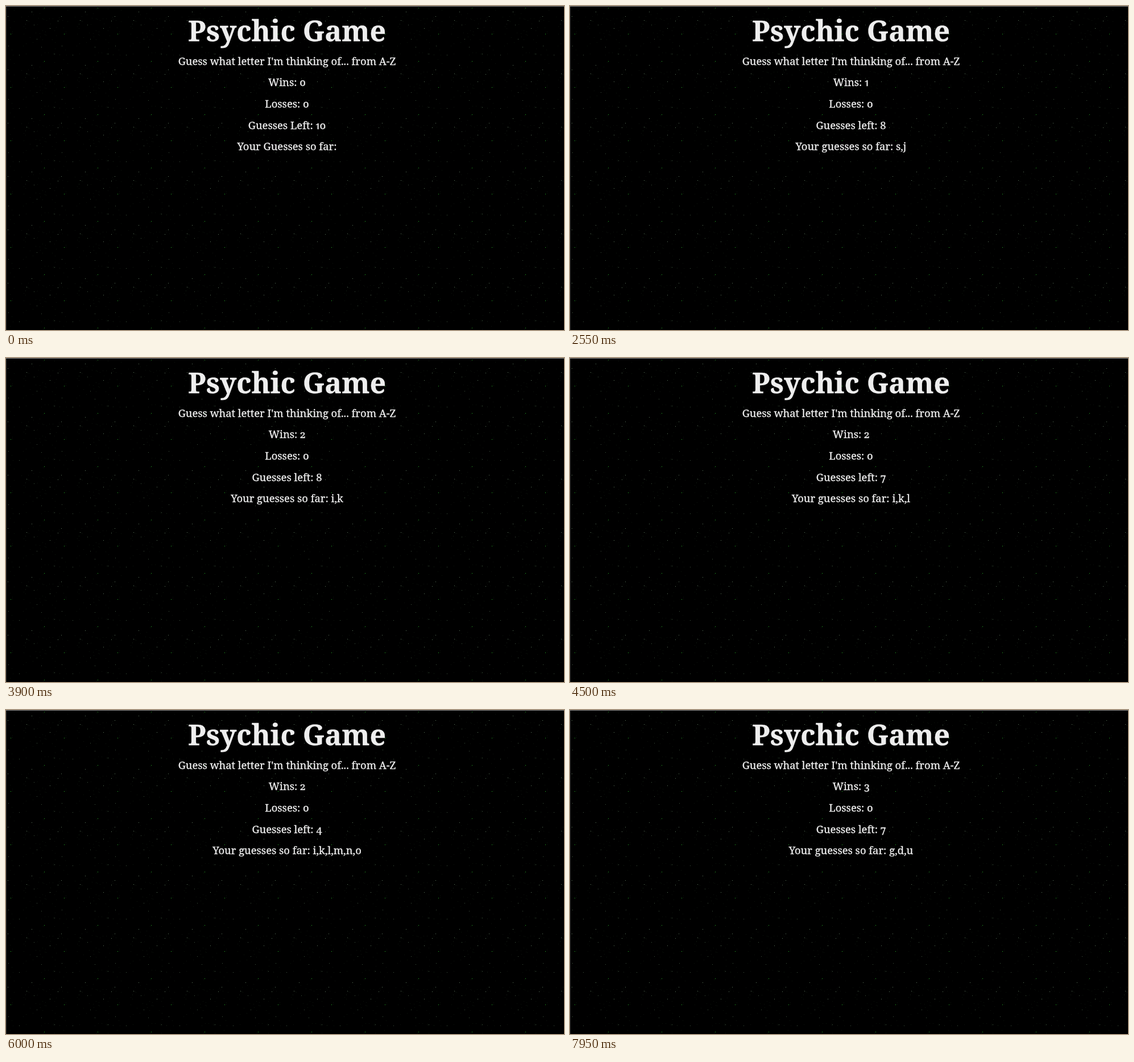
These frames come from a looping animation (981x571 px, 8 s). An HTML page:

```html
<!DOCTYPE html>
<html lang="en">
<head>
<meta charset="utf-8">
<title>Psychic Game</title>
<style>
  html, body { margin: 0; width: 100%; height: 100%; overflow: hidden; background: #000; }
  svg { display: block; width: 981px; height: 571px; }
  text {
    font: 18.4px "Noto Serif", serif;
    font-variant-numeric: oldstyle-nums proportional-nums;
    fill: #eee;
    stroke: #eee;
    stroke-width: .35px;
    text-anchor: middle;
  }
  .title { font-size: 50px; font-weight: 700; }
</style>
</head>
<body>
<svg viewBox="0 0 981 571">
  <defs>
    <pattern id="stars" width="94" height="94" patternUnits="userSpaceOnUse"></pattern>
  </defs>
  <rect width="981" height="571" fill="#000"/>
  <rect width="981" height="571" fill="url(#stars)"/>
  <rect width="1" height="571" fill="#2b2b2b"/>
  <rect width="981" height="1" fill="#8a8a8a"/>
  <text class="title" x="494" y="62">Psychic Game</text>
  <text x="494" y="103.5">Guess what letter I'm thinking of... from A-Z</text>
  <text id="wins" x="494" y="141"></text>
  <text x="494" y="179">Losses: 0</text>
  <text id="left" x="494" y="216.5"></text>
  <text id="guesses" x="494" y="254"></text>
</svg>
<script>
  const LOOP = 8000;
  const TILE = 94;
  const byId = id => document.getElementById(id);

  function addStar(x, y, fill) {
    const dot = document.createElementNS('http://www.w3.org/2000/svg', 'rect');
    const attrs = { x, y, width: 1, height: 1, fill };
    for (const name in attrs) dot.setAttribute(name, attrs[name]);
    byId('stars').append(dot);
  }

  // Star tile: faint seeded dust, then the visible stars grouped by colour.
  let seed = 7;
  const random = () => (seed = seed * 16807 % 2147483647) / 2147483647;
  const spot = () => Math.floor(random() * TILE);
  for (let i = 0; i < 60; i++) addStar(spot(), spot(), '#0c140c');

  const stars = {
    '#28b428': [[8, 49], [67, 3]],
    '#5f7a5f': [[36, 25], [91, 26], [45, 10], [77, 39], [3, 18]],
    '#3f553f': [[54, 58], [4, 70], [62, 72], [85, 84], [23, 86], [49, 33]]
  };
  for (const [color, spots] of Object.entries(stars)) {
    for (const [x, y] of spots) addStar(x, y, color);
  }

  // Start time, wins, letters guessed in the current round.
  const steps = [
    [0, 0, ''], [450, 1, ''], [900, 1, 's'], [2550, 1, 'sj'],
    [3000, 2, ''], [3450, 2, 'i'], [3900, 2, 'ik'], [4500, 2, 'ikl'],
    [4950, 2, 'iklm'], [5400, 2, 'iklmn'], [6000, 2, 'iklmno'],
    [6450, 3, ''], [7050, 3, 'g'], [7500, 3, 'gd'], [7950, 3, 'gdu']
  ];

  let shown;
  function show(step) {
    if (step === shown) return;
    shown = step;
    const [start, wins, letters] = step;
    const fresh = start === 0;
    byId('wins').textContent = `Wins: ${wins}`;
    byId('left').textContent = `Guesses ${fresh ? 'Left' : 'left'}: ${10 - letters.length}`;
    byId('guesses').textContent =
      `Your ${fresh ? 'Guesses' : 'guesses'} so far: ${[...letters].join()}`.trim();
  }

  const origin = performance.now();
  function tick() {
    const time = (performance.now() - origin) % LOOP;
    show(steps.findLast(([start]) => start <= time));
    requestAnimationFrame(tick);
  }
  tick();
</script>
</body>
</html>
```
